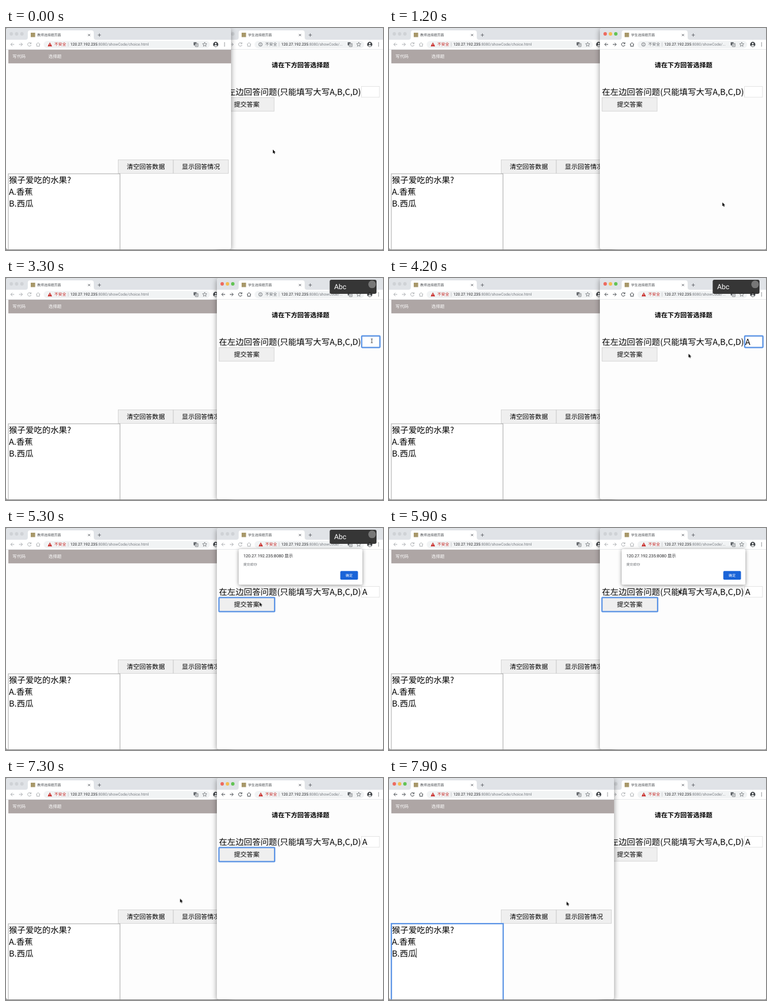
Animation, 640 px wide and 378 px high, one loop 8 s. Source, as an HTML page:

```html
<!DOCTYPE html>
<html lang="zh-CN">
<head>
<meta charset="utf-8">
<title>选择题</title>
<style>
html, body { margin: 0; width: 100%; height: 100%; overflow: hidden; background: #b4b4b4; }
svg { display: block; position: absolute; left: 0; top: 0; }
text { font-family: Roboto, "Noto Sans CJK SC", "Noto Sans CJK", sans-serif; text-rendering: geometricPrecision; white-space: pre; }
.stage { position: absolute; left: 0; top: 0; width: 640px; height: 378px; overflow: hidden; }
.win { position: absolute; top: 0; height: 377.4px; background: #fdfdfd; border-radius: 4px; box-shadow: 0 2px 10px rgba(0,0,0,.42); }
.win svg { border-radius: 4px; }
.left { left: 0; width: 381.5px; }
.right { left: 358px; width: 283px; z-index: 1; }
.top { z-index: 5; }

.tab { font-size: 5.75px; fill: #45494d; }
.url { font-size: 6.6px; fill: #777b80; }
.host { fill: #202124; }
.warn { font-size: 6.7px; fill: #c5221f; }
.info { font-size: 6.7px; fill: #5f6368; }
.menu { font-size: 7.4px; fill: #fff; }
.btn rect { fill: #efefef; stroke: #cfcfcf; stroke-width: .8; }
.btn text { font-size: 10.8px; text-anchor: middle; }
.big { font-family: "Noto Sans CJK SC", "Noto Sans CJK", sans-serif; font-size: 14.1px; }
.head { font-size: 10.9px; font-weight: 700; text-anchor: middle; }
.ring { fill: none; stroke: #5b94e6; stroke-width: 2.2; }
.dim { color: #a3a6aa; }
.dark { color: #54585c; }
.line { fill: none; stroke: currentColor; stroke-width: .9; }
.alert { filter: drop-shadow(0 1px 3px rgba(0,0,0,.45)); }

/* 8 s loop: 1.25% is one 100 ms step */
.left, .anim { animation: 8s step-end infinite; }
.left { animation-name: stack; }
.leftOn { animation-name: leftOn; }
.rightOn { animation-name: rightOn; }
.safe { animation-name: safe; }
.unsafe { animation-name: unsafe; }
.inputRing { animation-name: inputRing; }
.typed { animation-name: typed; }
.btnRing { animation-name: btnRing; }
.alert { animation-name: alert; }
.ok { animation-name: ok; }
.ime { animation-name: ime; }
.arrow { animation-name: arrow; }
.beam { animation-name: beam; }
.pointer { animation: move 8s linear infinite; }
@keyframes stack { 0% { z-index: 2 } 15% { z-index: 0 } 96.25%, 100% { z-index: 2 } }
@keyframes leftOn { 0% { opacity: 0 } 96.25%, 100% { opacity: 1 } }
@keyframes rightOn { 0% { opacity: 0 } 15% { opacity: 1 } 62.5% { opacity: 0 } 83.75% { opacity: 1 } 96.25%, 100% { opacity: 0 } }
@keyframes safe { 0% { opacity: 1 } 43.75%, 100% { opacity: 0 } }
@keyframes unsafe { 0% { opacity: 0 } 43.75%, 100% { opacity: 1 } }
@keyframes inputRing { 0% { opacity: 0 } 27.5% { opacity: 1 } 60%, 100% { opacity: 0 } }
@keyframes typed { 0% { opacity: 0 } 43.75%, 100% { opacity: 1 } }
@keyframes btnRing { 0% { opacity: 0 } 60% { opacity: 1 } 96.25%, 100% { opacity: 0 } }
@keyframes alert { 0% { opacity: 0 } 62.5% { opacity: 1 } 83.75%, 100% { opacity: 0 } }
@keyframes ok { 0% { fill: #1a64d8 } 78.75%, 100% { fill: #2c64b9 } }
@keyframes ime { 0% { opacity: 0 } 38.75% { opacity: 1 } 68.75%, 100% { opacity: 0 } }
@keyframes arrow { 0% { opacity: 1 } 23.75% { opacity: 0 } 50%, 100% { opacity: 1 } }
@keyframes beam { 0% { opacity: 0 } 23.75% { opacity: 1 } 50%, 100% { opacity: 0 } }
@keyframes move {
  0% { transform: translate(453px,207px); animation-timing-function: steps(5) }
  6.25% { transform: translate(566px,297px); animation-timing-function: step-end }
  15% { transform: translate(566px,297px); animation-timing-function: steps(7) }
  23.75% { transform: translate(611.5px,108.5px); animation-timing-function: step-end }
  27.5% { transform: translate(611.5px,108.5px); animation-timing-function: steps(6) }
  35% { transform: translate(621px,107px); animation-timing-function: step-end }
  48.75% { transform: translate(621px,107px); animation-timing-function: steps(3) }
  52.5% { transform: translate(508.5px,129px); animation-timing-function: steps(4) }
  57.5% { transform: translate(430.5px,126.5px); animation-timing-function: step-end }
  70% { transform: translate(430.5px,126.5px); animation-timing-function: steps(7) }
  78.75% { transform: translate(574.5px,77.5px); animation-timing-function: step-end }
  82.5% { transform: translate(574.5px,77.5px); animation-timing-function: steps(7) }
  91.25% { transform: translate(295.5px,205.5px); animation-timing-function: step-end }
  93.75% { transform: translate(295.5px,205.5px); animation-timing-function: steps(4) }
  98.75%, 100% { transform: translate(301.5px,210.5px); animation-timing-function: step-end }
}
</style>
</head>
<body>
<div class="stage">

<div class="win left">
<svg width="381.5" height="377.4" viewBox="0 0 381.5 377.4">
  <defs>
    <g id="frame">
      <path d="M0 0H384V20H0Z" fill="#e0e3e7"/>
      <path d="M33 20Q37 20 37 16V8Q37 4 41 4H145Q149 4 149 8V16Q149 20 153 20Z" fill="#fff"/>
      <path d="M0 20H384V36.5H0Z" fill="#fff"/>
      <path d="M0 36.5H384" stroke="#e3e5e8" stroke-width=".8"/>
      <g fill="#cfd2d6"><circle cx="9" cy="10" r="2.9"/><circle cx="18" cy="10" r="2.9"/><circle cx="27" cy="10" r="2.9"/></g>
      <rect x="42" y="8" width="7.5" height="7.5" fill="#a8986a"/>
      <path d="M139.3 10.2l3.6 3.6m0-3.6l-3.6 3.6M155.8 12h5.4M158.5 9.3v5.4" stroke="#5f6368" stroke-width=".9"/>
    </g>
    <g id="nav" class="line">
      <path d="M14 28H8m2.8-2.8L8 28l2.8 2.8M22 28h6m-2.8-2.8L28 28l-2.8 2.8"/>
      <path d="M42.2 26.2A3 3 0 1 0 42.6 29M42.6 24.6v2.2h-2.2"/>
      <path d="M51 28.2l3.5-3.2 3.5 3.2M52.2 27.6v3.5h4.6v-3.5"/>
    </g>
    <g id="lights">
      <circle cx="9" cy="10" r="2.9" fill="#ee6a5f"/><circle cx="18" cy="10" r="2.9" fill="#f5bd4f"/><circle cx="27" cy="10" r="2.9" fill="#61c454"/>
    </g>
    <g id="tools" fill="#5f6368">
      <rect x="318.5" y="24.2" width="5" height="5.4" rx=".6"/>
      <rect x="321.2" y="26.2" width="5" height="5.6" rx=".6" fill="#f1f3f4" stroke="#5f6368" stroke-width=".7"/>
      <path d="M322.3 28h2.8m-1.4-.8v.8m1 0q-.4 1.8-2.2 2.5m.4-1.8q.7 1.3 2 1.8" fill="none" stroke="#5f6368" stroke-width=".5"/>
      <path d="M337.3 24.2l1 2.5 2.7.2-2.1 1.7.7 2.6-2.3-1.4-2.3 1.4.7-2.6-2.1-1.7 2.7-.2z" fill="none" stroke="#5f6368" stroke-width=".7"/>
      <circle cx="356" cy="28" r="4.4" fill="#3f4347"/>
      <circle cx="356" cy="26.7" r="1.4" fill="#fff"/><path d="M353.2 30.4q2.8-2.6 5.6 0-2.8 2.4-5.6 0z" fill="#fff"/>
      <circle cx="371" cy="25.4" r=".75"/><circle cx="371" cy="28" r=".75"/><circle cx="371" cy="30.6" r=".75"/>
    </g>
    <g id="danger">
      <path d="M74.5 24.6L78.2 31.3H70.8Z" fill="#c5221f"/>
      <path d="M74.5 26.7v2.2m0 .7v.8" stroke="#fff" stroke-width=".8"/>
      <text class="warn" x="82" y="30.4">不安全</text>
    </g>
  </defs>
  <use href="#frame"/>
  <rect x="64" y="22" width="282" height="12.4" rx="6.2" fill="#f1f3f4"/>
  <use href="#nav" class="dim"/>
  <g class="anim leftOn"><use href="#nav" class="dark"/><use href="#lights"/></g>
  <use href="#tools"/>
  <use href="#danger"/>
  <path d="M105.5 24.5v7" stroke="#b9bcc0" stroke-width=".7"/>
  <text class="tab" x="53" y="14.1">教师选择题页面</text>
  <text class="url" x="109.3" y="30.4"><tspan class="host">120.27.192.235</tspan>:8080/showCode/choice.html</text>

  <rect x="4" y="37" width="378" height="23.2" fill="#aea6a5"/>
  <text class="menu" x="11" y="51.2">写代码</text>
  <text class="menu" x="72" y="51.2">选择题</text>

  <g class="btn"><rect x="190.5" y="224.5" width="93.3" height="23.2"/><text x="237.3" y="240">清空回答数据</text></g>
  <g class="btn"><rect x="284.2" y="224.5" width="93.3" height="23.2"/><text x="331" y="240">显示回答情况</text></g>

  <rect x="4" y="248.2" width="189.5" height="140" fill="#fff" stroke="#a2a2a2" stroke-width=".9"/>
  <text class="big" x="5" y="264.3">猴子爱吃的水果?</text>
  <text class="big" x="5" y="284">A.香蕉</text>
  <text class="big" x="5" y="303.6">B.西瓜</text>
  <g class="anim leftOn">
    <rect class="ring" x="4" y="248" width="189.8" height="140"/>
    <path d="M46.3 290v16" stroke="#000" stroke-width=".8"/>
  </g>
</svg>
</div>

<div class="win right">
<svg width="283" height="377.4" viewBox="358 0 283 377.4">
  <use href="#frame" x="358"/>
  <rect x="422" y="22" width="186" height="12.4" rx="6.2" fill="#f1f3f4"/>
  <use href="#nav" x="358" class="dim"/>
  <g class="anim rightOn"><use href="#nav" x="358" class="dark"/><use href="#lights" x="358"/></g>
  <use href="#tools" x="261.5"/>
  <g class="anim safe">
    <circle cx="432" cy="28" r="3" fill="none" stroke="#5f6368" stroke-width=".8"/>
    <path d="M432 27.5v2.2m0-3.7v.8" stroke="#5f6368" stroke-width=".8"/>
    <text class="info" x="440" y="30.4">不安全</text>
  </g>
  <g class="anim unsafe"><use href="#danger" x="358"/></g>
  <path d="M463.5 24.5v7" stroke="#b9bcc0" stroke-width=".7"/>
  <text class="tab" x="411" y="14.1">学生选择题页面</text>
  <text class="url" x="467.3" y="30.4"><tspan class="host">120.27.192.235</tspan>:8080/showCode/...</text>

  <text class="head" x="500" y="67">请在下方回答选择题</text>
  <text class="big" x="361.5" y="114.2">在左边回答问题(只能填写大写A,B,C,D)</text>
  <rect x="603.5" y="99.5" width="30.5" height="18.4" fill="#fff" stroke="#dedede" stroke-width=".8"/>
  <rect class="ring anim inputRing" x="603.8" y="98.7" width="31" height="19.6" rx="1"/>
  <text class="big anim typed" x="604.8" y="114.2">A</text>

  <g class="btn"><rect x="361.8" y="118.6" width="93.3" height="23.2"/><text x="408.6" y="133.9">提交答案</text></g>
  <rect class="ring anim btnRing" x="361.5" y="118.4" width="94.6" height="24" rx="1"/>

  <g class="anim alert">
    <rect x="395" y="36" width="210" height="60.5" rx="2" fill="#fff"/>
    <text x="403" y="50.2" font-size="7.2" fill="#202124">120.27.192.235:8080 显示</text>
    <text x="403" y="63.6" font-size="5.5" fill="#5f6368">提交成功!</text>
    <rect class="anim ok" x="567.5" y="73.3" width="30" height="14.8" rx="1.8"/>
    <text x="582.5" y="83" font-size="6" fill="#fff" text-anchor="middle">确定</text>
  </g>
</svg>
</div>

<svg class="top" width="640" height="378" viewBox="0 0 640 378">
  <g class="anim ime">
    <rect x="549.5" y="3" width="79.5" height="24" rx="3" fill="#2d2d2d" fill-opacity=".95"/>
    <circle cx="621.5" cy="10.8" r="6.5" fill="#777"/>
    <text x="557" y="19.2" font-size="12" fill="#fff">Abc</text>
  </g>
  <g class="pointer">
    <path class="anim arrow" d="M0 0V6.4L1.5 5.1 2.5 7.5 3.6 7 2.6 4.7H4.6Z" stroke="#fff" stroke-width=".7" paint-order="stroke"/>
    <path class="anim beam" d="M-1.4-3.5Q0-3.5 0-2.6 0-3.5 1.4-3.5M0-2.8V2.8M-1.4 3.5Q0 3.5 0 2.6 0 3.5 1.4 3.5" fill="none" stroke="#222" stroke-width=".8"/>
  </g>
</svg>

</div>
</body>
</html>
```
